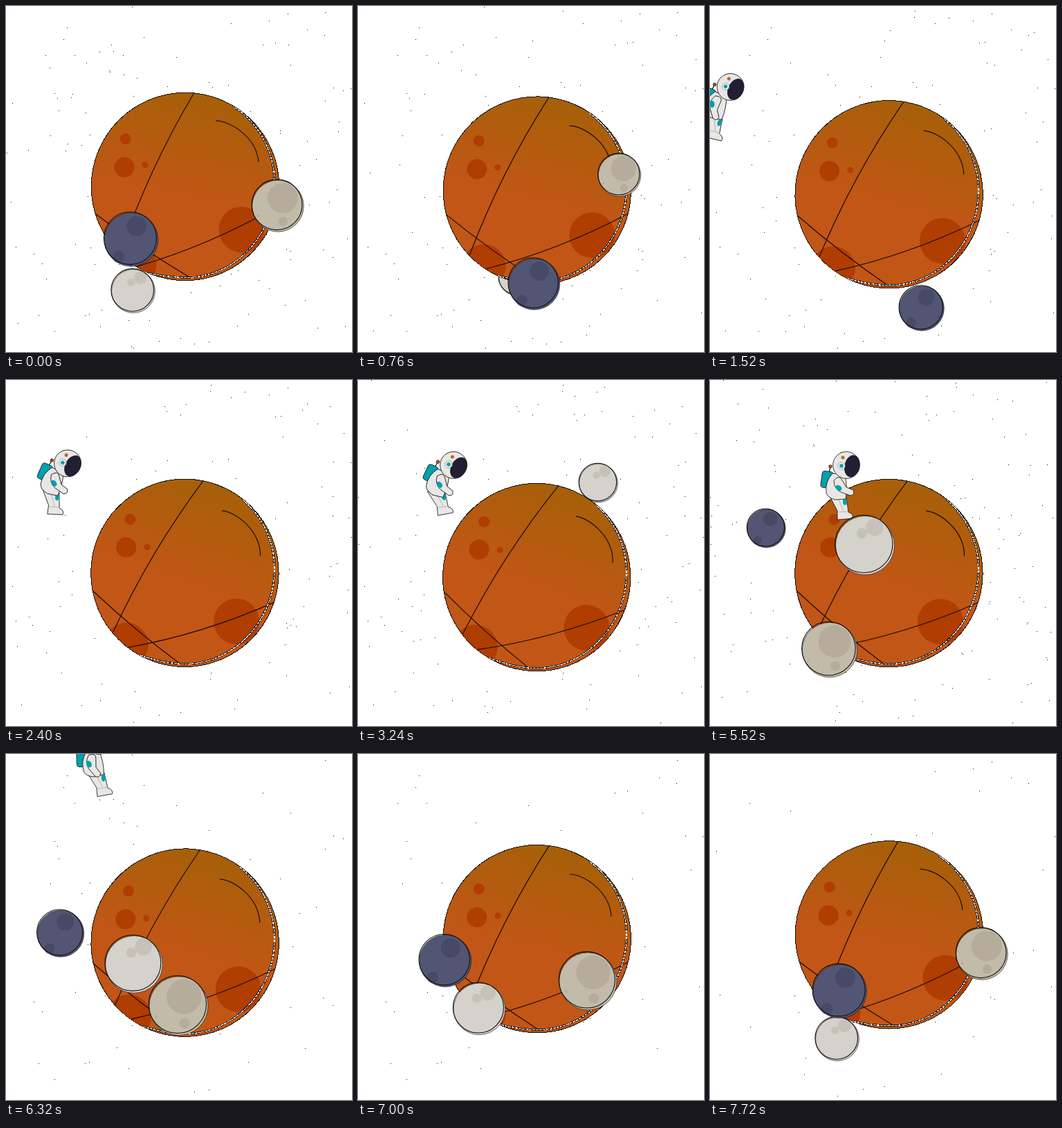
Recreate the animation shown at these times as an HTML page. Size 500 px wide and 500 px high, loop 7.76 s.

```html
<!DOCTYPE html>
<html lang="en">
<head>
<meta charset="utf-8">
<title>Planet and moons</title>
<style>
  html, body { margin: 0; width: 100%; height: 100%; overflow: hidden; background: #fff; }
  svg { display: block; width: 100%; height: 100%; }
  .line { fill: none; stroke: #1a0c04; stroke-width: 1.2; }
  .spot { fill: #b03d02; }
  .suit { fill: #e9e7e5; stroke: #9a9795; stroke-width: .6; }
  .teal { fill: #00a0ae; }
  .edge { stroke: #111; stroke-width: .8; }
  .crisp { shape-rendering: crispEdges; }
</style>
</head>
<body>
<svg viewBox="0 0 500 500">
  <defs>
    <linearGradient id="surface" gradientUnits="userSpaceOnUse" x1="25" y1="-134" x2="-10" y2="18">
      <stop offset="0" stop-color="#a66008"/>
      <stop offset="1" stop-color="#c25616"/>
    </linearGradient>
    <clipPath id="disc"><circle r="135.5"/></clipPath>
    <path id="rim" d="M72-114C108-90 130-48 129-2C128 70 72 132 0 131.5Q-28 131-52 125"/>
  </defs>

  <path id="stars" class="crisp" fill="#111"/>
  <g id="back"></g>

  <g id="planet">
    <circle class="crisp" r="135.7" fill="url(#surface)" stroke="#111"/>
    <g class="spot" clip-path="url(#disc)">
      <circle cx="-86.5" cy="-69" r="8"/>
      <circle cx="-88" cy="-28" r="14.5"/>
      <circle cx="-58" cy="-31.5" r="4.5"/>
      <circle cx="81.5" cy="62" r="33"/>
      <circle cx="-73.5" cy="112" r="32"/>
    </g>
    <g class="line">
      <path d="M12.5-135Q-53-25-94.5 96.5"/>
      <path d="M-129.5 39.5Q-63 90 8 132"/>
      <path d="M-70 115.5Q35 85 132.5 29"/>
      <path d="M44-95C62-96 102-74 106-36"/>
    </g>
    <g class="crisp" fill="none">
      <use href="#rim" stroke="#111" stroke-width="2.6"/>
      <use href="#rim" stroke="#fff" stroke-width="1.2" stroke-dasharray="4 1"/>
    </g>
  </g>

  <g id="astronaut">
    <path class="line" d="M-23 2L-25 11"/>
    <circle class="edge" cx="-23" cy="2" r="2.2" fill="#c05a18"/>
    <rect class="teal edge" x="-36" y="9" width="16" height="24" rx="4" transform="rotate(8 -28 21)"/>
    <g id="legs">
      <path class="suit edge" d="M-25 43L-13 66V79L9 77Q11 71 3 68L0 46Z"/>
      <path class="suit" d="M-13 68L3 67M-11 50L-4 66"/>
      <ellipse class="teal" cx="-2" cy="53" rx="3" ry="5"/>
    </g>
    <path class="suit edge" d="M-20 12Q-31 24-29 40Q-27 47-16 50L-1 49Q2 32-2 14Z"/>
    <g id="arm">
      <path class="suit edge" d="M-18 22Q-10 13-6 22L0 32L10 36Q13 43 6 44L-8 39Q-18 34-18 22Z"/>
      <ellipse class="teal" cx="-11" cy="33" rx="5" ry="3.6" transform="rotate(35 -11 33)"/>
    </g>
    <circle class="suit edge" r="19.4"/>
    <ellipse cx="8.3" cy="1.5" rx="11" ry="16.2" fill="#221f33" transform="rotate(12 8.3 1.5)"/>
    <circle class="suit" cx="-7" cy="1" r="5.3"/>
    <circle class="teal" cx="-7" cy="1" r="2.7"/>
    <circle cx="-5" cy="-11" r="2.5" fill="#b8692a"/>
  </g>
  <g id="front"></g>
</svg>

<script>
const LOOP = 7760, PEAK = 4040, TAU = 2 * Math.PI;
const $ = id => document.getElementById(id);

// path: a few [time, x, y] points of the orbit; nearest: time when the moon looks largest
// spots: [x, y, radius] in units of the moon's radius
const moons = [
  { fill: '#d5d1cb', spot: '#c7c2b9', period: 7720, nearest: 5700, size: 32.2, depth: 10.4,
    path: [[0, 184, 412], [1640, 290, 330], [3240, 347.5, 149], [4280, 309.5, 141.5],
      [5520, 224, 239], [6320, 185, 304]],
    spots: [[.33, -.62, .3], [-.1, -.41, .18]] },
  { fill: '#c3bbaa', spot: '#b5ac9b', period: 7720, nearest: 6450, size: 31.6, depth: 11,
    path: [[0, 393, 289], [1660, 317, 210], [3240, 165, 268], [4280, 86.5, 376],
      [5520, 173, 390], [6320, 249.5, 364]],
    spots: [[.18, -.31, .59], [.2, .59, .18], [-.76, .37, .05]] },
  { fill: '#525573', spot: '#474a66', period: 7640, nearest: 0, size: 29.3, depth: 9.5,
    path: [[0, 181, 337.5], [1520, 306, 437], [3240, 250, 290], [4280, 185, 235],
      [5520, 81.5, 214.5], [6320, 79, 259.5]],
    spots: [[.2, -.5, .37], [-.48, .64, .22]] }
];

// [time, helmet x, helmet y, body angle, leg angle]
const flight = [[0, -110, 92, 16, 6], [1520, 29.5, 117, 14, 5], [3240, 138, 123, 17, -22],
  [4280, 190, 138, 11, -22], [5520, 197, 123, 0, 0], [6320, 134, -19, -10, 5], [6900, 50, -150, -18, 6]];

// Cubic interpolation through unevenly spaced keys
function sample(keys, t) {
  const last = keys.length - 1;
  t = Math.min(Math.max(t, keys[0][0]), keys[last][0]);
  let i = 0;
  while (i < last - 1 && keys[i + 1][0] <= t) i++;
  const a = keys[i], b = keys[i + 1];
  const before = keys[Math.max(i - 1, 0)], after = keys[Math.min(i + 2, last)];
  const span = b[0] - a[0], u = (t - a[0]) / span, v = 1 - u;
  return a.slice(1).map((p, n) => {
    const k = n + 1;
    const ma = (b[k] - before[k]) / (b[0] - before[0]) * span;
    const mb = (after[k] - a[k]) / (after[0] - a[0]) * span;
    return v * v * (1 + 2 * u) * p + u * u * (3 - 2 * u) * b[k] + u * v * (v * ma - u * mb);
  });
}

function closeOrbit(keys, period) {
  const shift = (list, by) => list.map(([t, ...rest]) => [t + by, ...rest]);
  return [...shift(keys.slice(-2), -period), ...keys, ...shift(keys.slice(0, 3), period)];
}

function add(parent, tag, attrs = {}) {
  const node = document.createElementNS('http://www.w3.org/2000/svg', tag);
  for (const name in attrs) node.setAttribute(name, attrs[name]);
  return parent.appendChild(node);
}

const layers = [$('back'), $('front')].map(layer => moons.map(() => add(layer, 'g')));

moons.forEach((moon, i) => {
  moon.orbit = closeOrbit(moon.path, moon.period);
  moon.node = add(layers[1][i], 'g');
  const thin = { stroke: '#111', 'vector-effect': 'non-scaling-stroke' };
  add(moon.node, 'circle', { r: 1, fill: moon.fill, ...thin, 'stroke-width': .6 });
  for (const [cx, cy, r] of moon.spots) add(moon.node, 'circle', { cx, cy, r, fill: moon.spot });
  add(moon.node, 'circle', { cx: -.04, cy: -.05, r: .98, fill: 'none', ...thin, 'stroke-width': 1.1 });
});

let seed = 71;
const random = () => (seed = seed * 16807 % 2147483647) / 2147483647;
const stars = Array.from({ length: 330 }, () => ({
  x: Math.floor(random() * 500), y: Math.floor(random() * 500), phase: random()
}));

function drawStars(t) {
  const density = t < 5800 ? .45 : .18;
  $('stars').setAttribute('d', stars
    .filter(s => (s.phase + t / LOOP) % 1 < density)
    .map(s => `M${s.x} ${s.y}h1v1h-1z`).join(''));
}

function drawMoon(moon, i, time) {
  const t = time % moon.period;
  const [x, y] = sample(moon.orbit, t);
  const nearness = Math.cos(TAU * (t - moon.nearest) / moon.period);
  const layer = layers[nearness < -.17 ? 0 : 1][i];
  if (moon.node.parentNode !== layer) layer.appendChild(moon.node);
  const radius = moon.size + moon.depth * nearness;
  moon.node.setAttribute('transform', `translate(${x} ${y}) scale(${radius})`);
}

function drawAstronaut(t) {
  const [x, y, tilt, swing] = sample(flight, t);
  $('astronaut').setAttribute('transform', `translate(${x} ${y}) rotate(${tilt})`);
  $('legs').setAttribute('transform', `rotate(${swing} -14 45)`);
  $('arm').setAttribute('transform', `rotate(${8 * Math.max(0, swing)} -12 20)`);
}

function draw(t) {
  const sway = t < PEAK ? t / PEAK : (LOOP - t) / (LOOP - PEAK);
  $('planet').setAttribute('transform', `translate(${259 - sway} ${261 + 30 * sway}) rotate(${10 * sway})`);
  moons.forEach((moon, i) => drawMoon(moon, i, t));
  drawAstronaut(t);
  drawStars(t);
}

const start = performance.now();
function tick() {
  const t = (performance.now() - start) % LOOP;
  draw(Math.floor(t / 40) * 40);
  requestAnimationFrame(tick);
}
tick();
</script>
</body>
</html>
```
